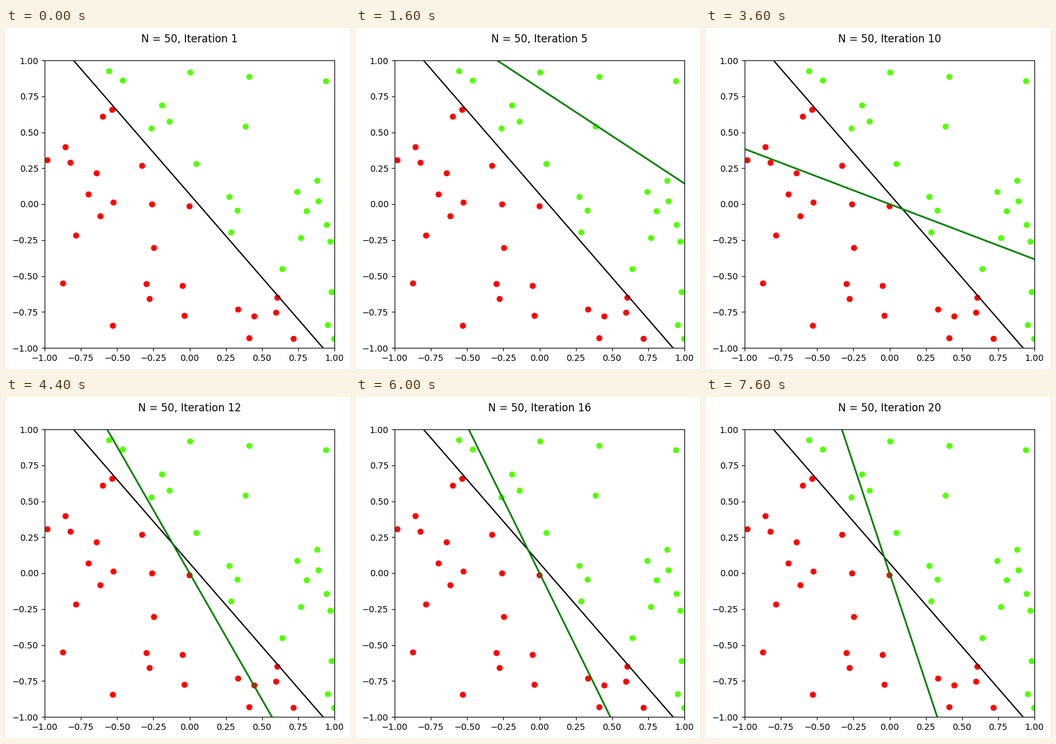
Recreate the animation shown at these times as a matplotlib script. Size 552x548 px, loop 8 s.

```python
import numpy as np
import matplotlib.pyplot as plt
from matplotlib.animation import FuncAnimation

W, H, DPI = 552, 548, 100
LEFT, RIGHT, TOP, BOTTOM = 62, 527, 52, 514
COLORS = {-1: "#ff0000", 1: "#54ff00"}
COUNTS = {-1: 26, 1: 24}

# Points that steer the perceptron, in order of their first visit
KEY_POINTS = [
    (-.699, .070), (.272, .054), (.411, -.932), (.978, -.610), (.716, -.935),
    (-.191, .689), (.286, -.194), (-.983, .309), (.597, -.752), (-.265, .528),
    (-.600, .610), (.445, -.778), (-.535, .658), (.329, -.045), (.994, -.933)]
VISITS = [*range(11), 3, 11, 1, 12, 13, 11, 14, 9, 10]


def boundary(x):
    return 1 - 2 * (x + .801) / 1.722


def label(point):
    return 1 if point[1] > boundary(point[0]) else -1


def fill_cloud(points, gap=.1, seed=4):
    """Add well-spaced random points until each class is complete."""
    rng = np.random.default_rng(seed)
    points = list(points)
    labels = [label(p) for p in points]
    while len(points) < sum(COUNTS.values()):
        p = rng.uniform(-1, 1, 2)
        side = label(p)
        spaced = np.hypot(*(np.array(points) - p).T).min() > gap
        if spaced and labels.count(side) < COUNTS[side]:
            points.append(p)
            labels.append(side)
    return np.array(points), np.array(labels)


points, labels = fill_cloud(KEY_POINTS)

# Perceptron rule: each visited point adds label * (1, x, y)
inputs = np.column_stack([np.ones(len(points)), points])
weights = np.cumsum((labels[:, None] * inputs)[VISITS], axis=0)

fig = plt.figure(figsize=(W / DPI, H / DPI), dpi=DPI, facecolor="white")
ax = fig.add_axes([LEFT / W, 1 - BOTTOM / H, (RIGHT - LEFT) / W, (BOTTOM - TOP) / H])
ax.set_xlim(-1, 1)
ax.set_ylim(-1, 1)

xs = np.array([-1.0, 1.0])
ax.plot(xs, boundary(xs), "k-")
for side, color in COLORS.items():
    ax.scatter(*points[labels == side].T, c=color)
guess, = ax.plot([], [], "g-", lw=2)
title = ax.set_title("")


def draw(step):
    bias, wx, wy = weights[step]
    guess.set_data(xs, -(bias + wx * xs) / wy)
    title.set_text(f"N = {len(points)}, Iteration {step + 1}\n")
    return guess, title


anim = FuncAnimation(fig, draw, frames=len(VISITS), interval=400,
                     repeat=True, repeat_delay=0)
plt.show()
```
